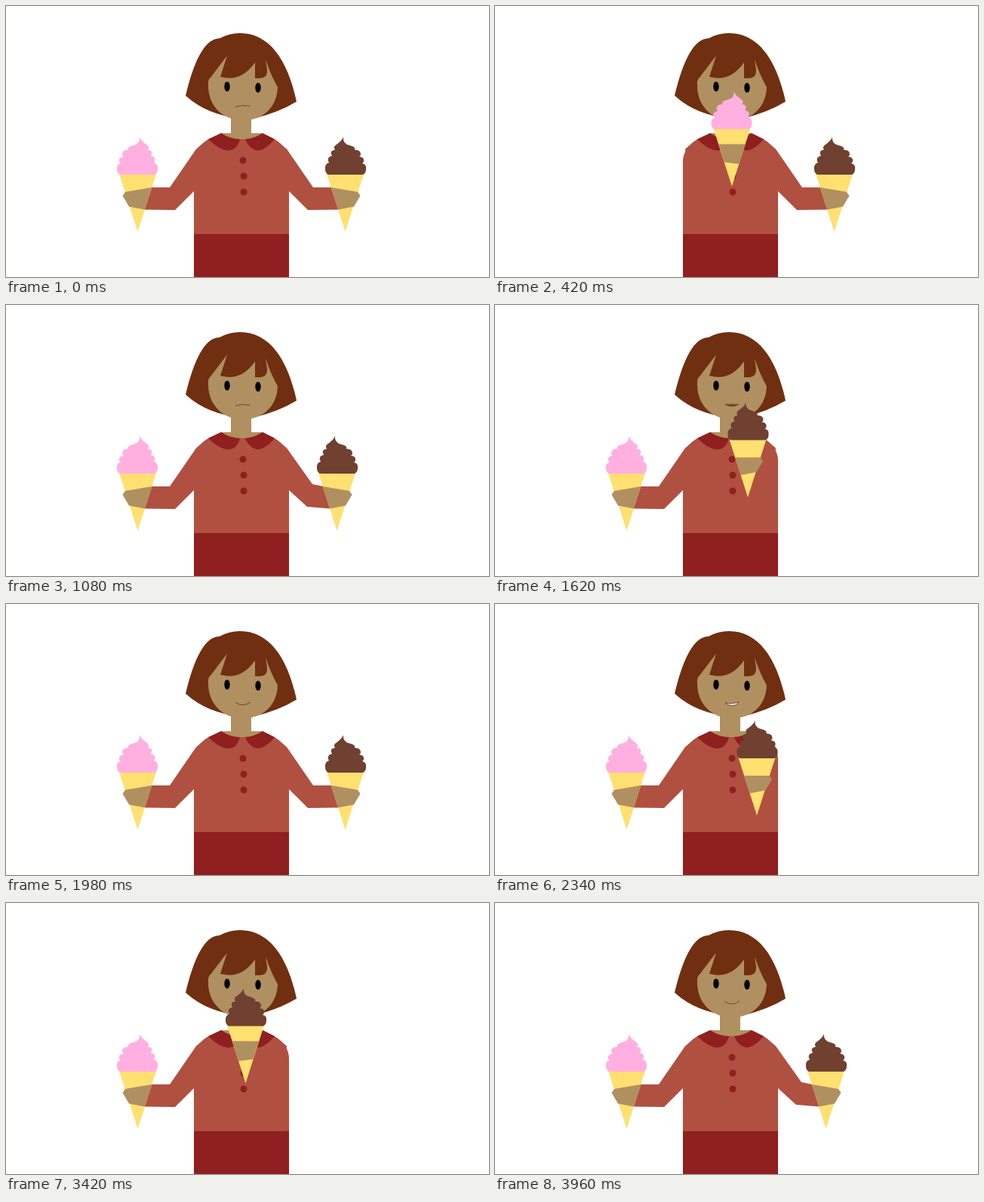
Animation, 640 px wide and 360 px high, one loop 4020 ms. Source, as an HTML page:

```html
<!DOCTYPE html>
<html lang="en">
<head>
<meta charset="utf-8">
<title>Two ice creams</title>
<style>
html, body { margin: 0; width: 100%; height: 100%; overflow: hidden; background: #fff; }
svg { display: block; width: 640px; height: 360px; }
.skin { fill: #b09060; }
.shirt { fill: #b05040; }
.dark { fill: #901f1f; }
</style>
</head>
<body>
<svg viewBox="0 0 640 360">
  <defs>
    <g id="ice">
      <path fill="#ffe070" d="M425 223H474L449.5 300Z"/>
      <path d="M447 174Q446 183 455 185Q464 187 462 191Q470 191 470 197Q470 199 468 200Q475 201 474 206Q474 208 472 209Q478 210 477 217Q477 222 473 224H427Q423 222 423 217Q422 210 428 208Q424 201 432 199Q428 192 436 191Q433 187 438 184Q445 179 447 174Z"/>
    </g>
  </defs>
  <path fill="#702f10" d="M238 119Q256 43 283 43Q296 36 310 36C348 36 373 70 385 127Q362 141 330 149L290 146Q258 138 238 119Z"/>
  <path class="skin" d="M268 106Q267 98 271 95L293 66L284 94Q311 102 330 75V96H337Q347 95 346 85L344 71Q350 90 360 108C359 135 340 152 314 152C288 152 268 133 268 106Z"/>
  <ellipse cx="293" cy="107" rx="3.7" ry="6.6"/>
  <ellipse cx="334" cy="108.5" rx="3.7" ry="6.6"/>
  <path id="mouth" stroke="#704828"/>
  <g transform="matrix(-1 0 0 1 624 0)"><polygon id="sleeve0" class="shirt"/></g>
  <polygon id="sleeve1" class="shirt"/>
  <path class="shirt" d="M249 303V207Q249 189 268 177L285 169H340L356 177Q375 189 375 207V303Z"/>
  <path class="skin" d="M298 145H325V169H340Q312 185 285 169H298Z"/>
  <path class="dark" d="M249 303H375V360H249ZM268 177L285 169Q297 177 310 177Q306 192 294 192Q282 191 268 177ZM317 177Q330 176 340 169L356 177Q343 192 333 192Q322 190 317 177Z"/>
  <g class="dark">
    <circle cx="314" cy="205" r="4.5"/>
    <circle cx="315" cy="226" r="4.5"/>
    <circle cx="315" cy="247" r="4.5"/>
  </g>
  <g transform="matrix(-1 0 0 1 624 0)">
    <g id="cone0" fill="#ffb0e0"><use href="#ice"/><polygon id="hand0" class="skin"/></g>
  </g>
  <g id="cone1" fill="#704030"><use href="#ice"/><polygon id="hand1" class="skin"/></g>
</svg>
<script>
const STEP = 60, STEPS = 67;
const el = id => document.getElementById(id);

// From mouth to rest: cone offset x, y, elbow x, y, height of the thumb above the cone's point
const poses = [
  [-132, -60.5, 366, 232, 56],
  [-114.5, -44.5, 366, 232, 53],
  [-102.5, -19, 368, 234, 53],
  [-79, -8, 380, 235, 54],
  [-56, -2, 390, 236, 56],
  [-33, 0, 399, 237, 58],
  [-11, 0, 406, 238, 59],
  [0, 0, 407, 241, 59]
];
// One pose per step for each arm
const pink = '76543210001234567'.padEnd(STEPS, '7');
const brown = '7'.repeat(18) + '6543210' + '00' + '1234567' + '76543210' +
  '00012210' + '00012210' + '000123456';

const mouths = {
  frown: ['none', 'M304 134Q313 130.5 323 133'],
  smile: ['none', 'M304 130.5Q314 138 324 130'],
  open: ['#704828', 'M305 132H323Q314 137 305 132Z'],
  teeth: ['#fff', 'M305 131Q313 134 323 130Q320 135 314 135Q309 135 305 131Z']
};

function setArm(side, p, reach) {
  const [x, dy, ex, ey, thumb] = poses[p];
  const dx = x * reach;
  const tx = 449.5 - thumb * 24.5 / 77, ty = 300 - thumb;
  const rest = p ? '466,247 469.5,252 461,266.5' : '467,244 459.5,268';
  const knuckles = p && p < 6 ? '466,' + (p < 3 ? 247 : 246.5) + ' 469.5,252 461,266.5' : rest;
  el('cone' + side).setAttribute('transform', `translate(${dx} ${dy})`);
  el('hand' + side).setAttribute('points', `${tx},${ty} ${knuckles} 440,270.5`);
  el('sleeve' + side).setAttribute('points',
    `360,180 372,190 ${ex},${ey} ${tx + dx + 1},${ty + dy} ${441 + dx},${270.5 + dy} ${ex - 7},${ey + 30} 375,246 350,220`);
}

function mouthAt(i) {
  if (i < 27) return 'frown';
  if (brown[i] < 2) return 'open';
  return brown[i] === '2' && brown[i + 1] === '1' ? 'teeth' : 'smile';
}

function draw(now) {
  const i = Math.floor(now / STEP) % STEPS;
  setArm(0, +pink[i], 1.056);
  setArm(1, +brown[i], 1);
  const [fill, d] = mouths[mouthAt(i)];
  el('mouth').setAttribute('fill', fill);
  el('mouth').setAttribute('d', d);
  requestAnimationFrame(draw);
}
draw(0);
</script>
</body>
</html>
```
